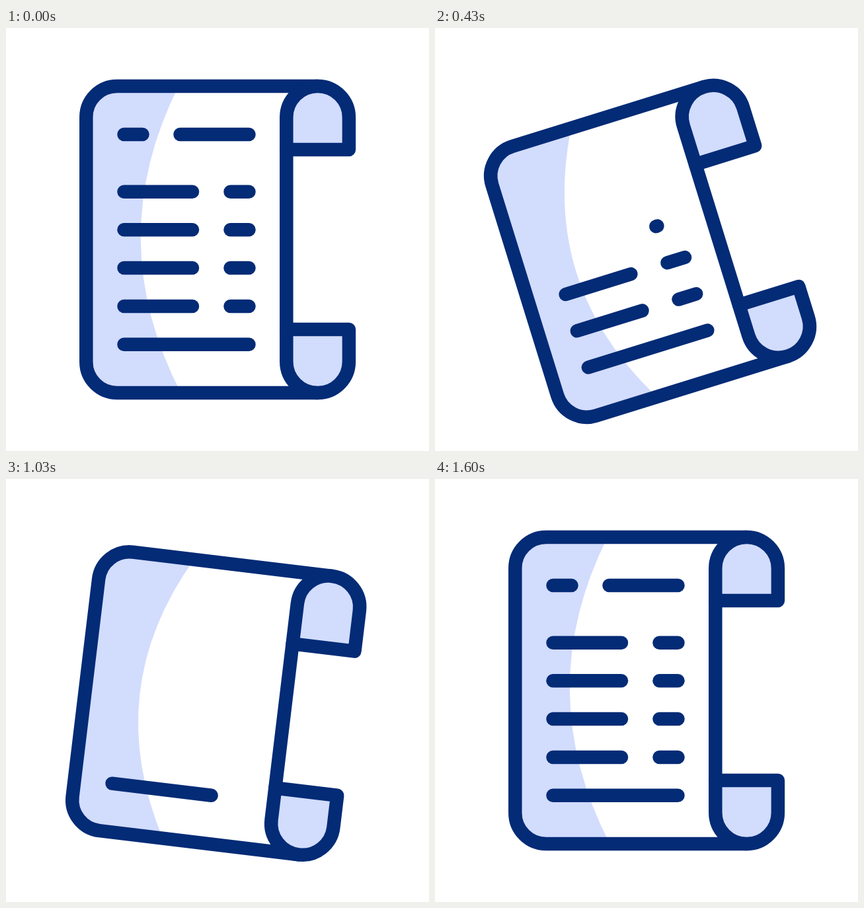
An HTML page with a canvas that plays this animation: 640x640 px, repeating every 2 s.

```html
<!DOCTYPE html>
<html>
<head>
<meta charset="utf-8">
<style>
html, body { margin: 0; overflow: hidden; background: #fff; }
canvas { display: block; width: 100vmin; height: 100vmin; }
</style>
</head>
<body>
<canvas width="640" height="640"></canvas>
<script>
const ctx = document.querySelector('canvas').getContext('2d');
const NAVY = '#032b76', TINT = '#d2dcfd';
const LOOP = 2000, FRAME = 100 / 3;

// Key times are in frames of 1/30 s
const TILT = [[0.3, 0], [18, -21.4], [27.9, 10.3], [38, -5], [48, 0]];
const ROLL = [[7.3, 0], [23.2, 127], [35.6, 0]];

// Text bars in the order they vanish: x1, x2, y
const bars = [[178.5, 206.5, 161], [263.5, 367.5, 161]];
for (const y of [247.7, 305.3, 363, 420.9]) bars.push([178.5, 282, y], [339.5, 367.5, y]);
bars.push([178.5, 367.5, 478.7]);

const clamp = v => Math.min(1, Math.max(0, v));

function track(keys, f) {
  let value = keys[0][1];
  for (let i = 1; i < keys.length; i++) {
    const [t0, a] = keys[i - 1], [t1, b] = keys[i];
    const u = clamp((f - t0) / (t1 - t0));
    value += (b - a) * u * u * (3 - 2 * u);
  }
  return value;
}

function barLength(i, f) {
  return f < 24
    ? 1 - clamp((f - 4.75 - i * 1.375) / 1.5)
    : clamp((f - 29.8 - (10 - i) * 1.2) / 1.5);
}

function draw(f) {
  const drop = track(ROLL, f);
  const top = 88 + drop, flap = 184 + drop * 1.325;

  ctx.setTransform(1, 0, 0, 1, 0, 0);
  ctx.clearRect(0, 0, 640, 640);
  ctx.translate(320, 320);
  ctx.rotate(track(TILT, f) * Math.PI / 180);
  ctx.translate(-320, -320);
  ctx.lineWidth = 20.5;
  ctx.lineCap = ctx.lineJoin = 'round';
  ctx.strokeStyle = NAVY;
  ctx.fillStyle = TINT;

  const leftSide = `H168A46.7 46.7 0 0 0 121.3 ${top + 46.7}V505.3A46.7 46.7 0 0 0 168 552H`;
  ctx.fill(new Path2D(`M261 ${top}${leftSide}264.5Q145 ${(top + 552) / 2} 261 ${top}Z`));
  ctx.stroke(new Path2D(`M471.6 ${top}${leftSide}471.6M424.3 ${flap}V456`));

  const curls = new Path2D(
    `M424.3 ${flap}V${top + 47.3}A47.3 47.3 0 0 1 518.9 ${top + 47.3}V${flap}Z` +
    'M424.3 456V504.7A47.3 47.3 0 0 0 518.9 504.7V456Z');
  ctx.fill(curls);
  ctx.stroke(curls);

  bars.forEach(([x1, x2, y], i) => {
    const part = barLength(i, f);
    if (part > 0) ctx.stroke(new Path2D(`M${x1} ${y}H${x1 + (x2 - x1) * part}`));
  });
}

function tick() {
  // The motion is stepped at 30 frames per second
  draw(Math.floor((performance.now() % LOOP + 4) / FRAME) % 60);
  requestAnimationFrame(tick);
}
tick();
</script>
</body>
</html>
```
